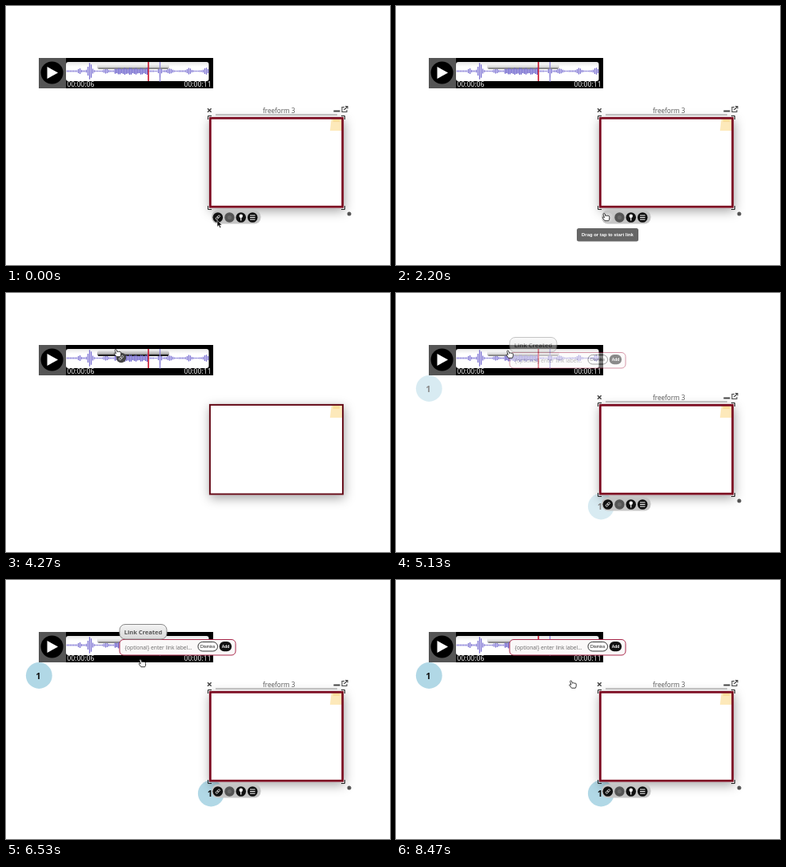
Write an HTML page that moves like this. It is 480 px wide and 324 px high and loops after 8590 ms.

```html
<!DOCTYPE html>
<html lang="en">
<head>
<meta charset="utf-8">
<title>Linking a window to an audio clip</title>
<style>
html, body { margin: 0; width: 100%; height: 100%; overflow: hidden; background: #fff; }
svg { display: block; width: 100vw; height: 100vh; }
text { font-family: "Open Sans", "Noto Sans", sans-serif; }
.ui { font-family: "Liberation Sans", Arial, sans-serif; }
.bold { font-weight: 700; }
</style>
</head>
<body>
<svg viewBox="0 0 480 324">
  <defs>
    <linearGradient id="barFill" x2="0" y2="1">
      <stop offset="0" stop-color="#f8f8f8"/><stop offset=".6" stop-color="#dcdcdc"/><stop offset="1" stop-color="#858585"/>
    </linearGradient>
    <linearGradient id="barHot" x2="0" y2="1">
      <stop offset="0" stop-color="#e4e4e4"/><stop offset=".55" stop-color="#b4b4b4"/><stop offset="1" stop-color="#282828"/>
    </linearGradient>
    <linearGradient id="trackFill" x2="0" y2="1">
      <stop offset="0" stop-color="#e6e6e6"/><stop offset=".25" stop-color="#fff"/>
    </linearGradient>
    <linearGradient id="noticeFill" x2="0" y2="1">
      <stop offset="0" stop-color="#f4f4f4"/><stop offset="1" stop-color="#d8d8d8"/>
    </linearGradient>
    <filter id="shadow" x="-20%" y="-20%" width="140%" height="150%">
      <feDropShadow dx="1" dy="4" stdDeviation="7" flood-color="#000" flood-opacity=".36"/>
    </filter>
    <g id="chain" fill="none" stroke="#ddd" stroke-width=".9">
      <rect x="-3.2" y="-1.2" width="3.6" height="2.4" rx="1.2" transform="rotate(-45)"/>
      <rect x="-.4" y="-1.2" width="3.6" height="2.4" rx="1.2" transform="rotate(-45)"/>
    </g>
  </defs>
  <rect width="480" height="324" fill="#fff"/>

  <g id="player">
    <path d="M41 65H259V103H41Z"/>
    <path d="M41 65H75V103H41Z" fill="#555"/>
    <circle cx="57.5" cy="83.5" r="14"/>
    <path d="M51.5 76L65 83.5L51.5 91Z" fill="#fff"/>
    <rect x="75" y="70" width="178.500" height="24" rx="3" fill="url(#trackFill)"/>
    <path id="wave" stroke="#7a70d2" stroke-width="1.300"/>
    <rect id="bar" x="114" y="72" width="90" height="7" rx="3"/>
    <path id="barEdge" d="M116 78H202" stroke-linecap="round"/>
    <path id="waveOver" stroke="#6d63cb" stroke-width="1.300"/>
    <path d="M192.500 70V94.500" stroke="#8a82d8" stroke-width="1.300"/>
    <path d="M178 70V94" stroke="#cc2038" stroke-width="1.700"/>
    <g fill="#fff" font-size="8.6">
      <text x="76.300" y="101">00:00:06</text>
      <text x="222.500" y="101">00:00:11</text>
    </g>
  </g>

  <g id="badges" fill="#b1d8e6">
    <circle cx="41.300" cy="119.500" r="16.400"/>
    <circle cx="256.300" cy="267" r="16.400"/>
    <g class="bold" fill="#111" font-size="11" text-anchor="middle">
      <text x="40.300" y="123.700">1</text>
      <text x="255" y="271.200">1</text>
    </g>
  </g>

  <g id="window">
    <rect x="254" y="139" width="168" height="113.500" fill="#fff" filter="url(#shadow)"/>
    <path d="M407 140H421V156H405L406 147Z" fill="#fde9ba"/>
    <path d="M409 141H417V145H409Z" fill="#fbdf9c"/>
    <rect id="frame" fill="none"/>
  </g>

  <g id="chrome">
    <path d="M252.500 142V137.500H257M419 137.500H423.500V142M423.500 250V254.500H419M257 254.500H252.500V250" fill="none" stroke="#222"/>
    <path d="M262 136H414" stroke="#777" stroke-width=".8"/>
    <text x="341.200" y="133.600" font-size="8.1" fill="#555" text-anchor="middle">freeform 3</text>
    <path d="M252 128.200L256.600 132.800M256.600 128.200L252 132.800" stroke="#444" stroke-width="1.500"/>
    <path d="M409.500 131.500H417.500" stroke="#444" stroke-width="2"/>
    <path d="M423 126.500H420V132.500H426V130M422.500 130L426.500 126M424 125.500H427V128.500" fill="none" stroke="#444" stroke-width="1.100"/>
    <circle cx="429" cy="260" r="2.500" fill="#555"/>
    <rect x="257" y="255.500" width="61.500" height="17" rx="8" fill="#c5c5c5"/>
    <g id="linkButton"><circle cx="264.800" cy="264.500" r="6.300" fill="#111"/><use href="#chain" x="264.800" y="264.500"/></g>
    <circle id="linkHover" cx="264.800" cy="264.500" r="6.300" fill="#d0d0d0"/>
    <circle cx="279.400" cy="264.500" r="6.200" fill="#555"/>
    <circle cx="279.400" cy="264.500" r="2.600" fill="#686868"/>
    <circle cx="293.700" cy="264.500" r="6.300" fill="#111"/>
    <circle cx="293.700" cy="262.800" r="2.200" fill="#fff"/>
    <path d="M293.700 264V268.500" stroke="#fff" stroke-width="1.200"/>
    <circle cx="308.200" cy="264.500" r="6.300" fill="#111"/>
    <path d="M305 262H311.400M305 264.500H311.400M305 267H311.400" stroke="#fff" stroke-width="1.100"/>
  </g>
  <use id="badgeTop"/>

  <g id="tooltip">
    <rect x="226" y="278" width="77" height="16.500" rx="2.500" fill="#666"/>
    <text class="ui bold" x="264.500" y="288.300" font-size="5.9" fill="#fff" text-anchor="middle">Drag or tap to start link</text>
  </g>

  <g id="popup">
    <rect x="142" y="74.500" width="145" height="19.500" rx="5" fill="#faf8f8" stroke="#aa2a4c"/>
    <text x="148.500" y="86.800" font-size="6.7" fill="#666">{optional} enter link label...</text>
    <rect x="240" y="77.500" width="24.500" height="11.500" rx="5.700" fill="#fff" stroke="#222" stroke-width=".9"/>
    <rect x="266.700" y="77" width="15.300" height="12.300" rx="5.800" fill="#111"/>
    <text class="ui" x="252.200" y="85.200" font-size="5.2" fill="#111" text-anchor="middle">Dismiss</text>
    <text class="ui bold" x="274.400" y="85.200" font-size="4.9" fill="#fff" text-anchor="middle">Add</text>
  </g>
  <g id="notice">
    <rect x="142" y="55.500" width="59" height="18.500" rx="7" fill="url(#noticeFill)" stroke="#888"/>
    <text class="bold" x="171.500" y="67.700" font-size="7.5" fill="#555" text-anchor="middle">Link Created</text>
  </g>

  <g id="cursor">
    <g id="dragChip"><circle cx="4.500" cy="5.500" r="6.200" fill="#444"/><use href="#chain" x="4.500" y="5.500"/></g>
    <path id="arrow" d="M0 0V8.200L1.900 6.500L3.300 9.600L4.800 8.900L3.400 6H6Z" fill="#111" stroke="#fff" stroke-width=".5"/>
    <path id="hand" d="M-2.300 -5C-3.500 -5 -3.500 -4 -3.200 -3.300L-2 .2C-3.500 -.8 -4.800 -.3 -4 .8L-1.500 4.200H3.300C4.400 2.500 4.500 .5 4 -1.400C3.700 -2.200 2.800 -2.200 2.500 -1.500C2.200 -2.500 1.200 -2.500 .9 -1.800C.5 -2.600 -.4 -2.400 -.5 -1.800L-1.400 -4.500Z" fill="#fff" stroke="#222" stroke-width=".9" stroke-linejoin="round"/>
    <path id="beam" d="M-1.600 -5Q0 -5 0 -3.800Q0 -5 1.600 -5M0 -4V4M-1.600 5Q0 5 0 3.800Q0 5 1.600 5" fill="none" stroke="#222" stroke-width=".9"/>
  </g>
</svg>
<script>
const LOOP = 8590;
const $ = id => document.getElementById(id);
const clamp = v => Math.max(0, Math.min(1, v));
const ramp = (t, a, b) => clamp((t - a) / (b - a));
const ease = p => p * p * (3 - 2 * p);
const show = (id, opacity) => $(id).setAttribute('opacity', +opacity);
const set = (id, attrs) => {
  for (const key in attrs) $(id).setAttribute(key, attrs[key]);
};

// Each peak: centre, spread, half height
const peaks = [[92, 1.5, 3], [105, 2, 9.5], [125, 2, 2], [192.5, 1.2, 7], [205, 2.5, 2.2], [229, 2, 3], [250, 2, 3.2]];
function wavePath(from, to) {
  let d = '';
  for (let x = from; x < to; x += 2) {
    let h = 0.7 + 0.4 * Math.abs(Math.sin(x * 1.7));
    for (const [c, s, a] of peaks) h += a * Math.exp(-(((x - c) / s) ** 2) / 2);
    if (x > 136 && x < 178) h += 2.4 + 0.9 * Math.sin(x * 0.9);
    d += `M${x} ${81.5 - h}V${81.5 + h}`;
  }
  return d;
}
set('wave', { d: wavePath(76.5, 253) });
set('waveOver', { d: wavePath(136.5, 178) });

// Cursor stops: time, x, y
const stops = [
  [0, 264, 268], [70, 264, 268], [270, 269, 272], [470, 269, 272], [600, 267, 268],
  [1270, 267, 268], [1600, 262.5, 264.5], [2200, 262.5, 264.5], [2800, 162, 112.5],
  [3000, 157, 103], [3730, 144, 82], [4000, 144, 82], [4270, 139.5, 75.5],
  [4870, 139.5, 75.5], [5670, 150, 82], [6070, 150, 82], [7070, 196, 133],
  [7930, 196, 133], [8470, 221, 131], [LOOP, 221, 131]
];
function cursorAt(t) {
  const i = Math.max(1, stops.findIndex(s => s[0] >= t));
  const [t0, x0, y0] = stops[i - 1], [t1, x1, y1] = stops[i];
  const p = ease(ramp(t, t0, t1));
  return [x0 + (x1 - x0) * p, y0 + (y1 - y0) * p];
}

function render(t) {
  const dragging = t >= 2330 && t < 4940;
  const hovering = t >= 1470 && t < 2330;
  const hot = t >= 3330 && t < 4940;
  const typing = t >= 5270 && t < 6270;
  const linked = ramp(t, 5000, 5270);

  show('chrome', !dragging);
  show('linkButton', !hovering);
  show('linkHover', hovering);
  show('tooltip', ramp(t, 1800, 2000) * (1 - ramp(t, 2230, 2400)));
  show('badges', linked);
  show('popup', linked);
  show('notice', linked * (1 - ramp(t, 7400, 7730)));

  const inset = dragging ? 0.9 : 1.3;
  set('frame', {
    x: 254 + inset, y: 139 + inset, width: 168 - 2 * inset, height: 113.5 - 2 * inset,
    stroke: dragging ? '#650b18' : '#7d0c22', 'stroke-width': dragging ? 2 : 2.8
  });
  set('bar', { fill: hot ? 'url(#barHot)' : 'url(#barFill)' });
  set('barEdge', { stroke: hot ? '#222' : '#777', 'stroke-width': hot ? 2 : 1.2 });

  const [x, y] = cursorAt(t);
  set('cursor', { transform: `translate(${x} ${y})` });
  show('arrow', t < 1470);
  show('hand', t >= 1470 && !typing);
  show('beam', typing);
  show('dragChip', dragging);
}

const start = performance.now();
function tick() {
  render((performance.now() - start) % LOOP);
  requestAnimationFrame(tick);
}
$('badgeTop').remove();
tick();
</script>
</body>
</html>
```
